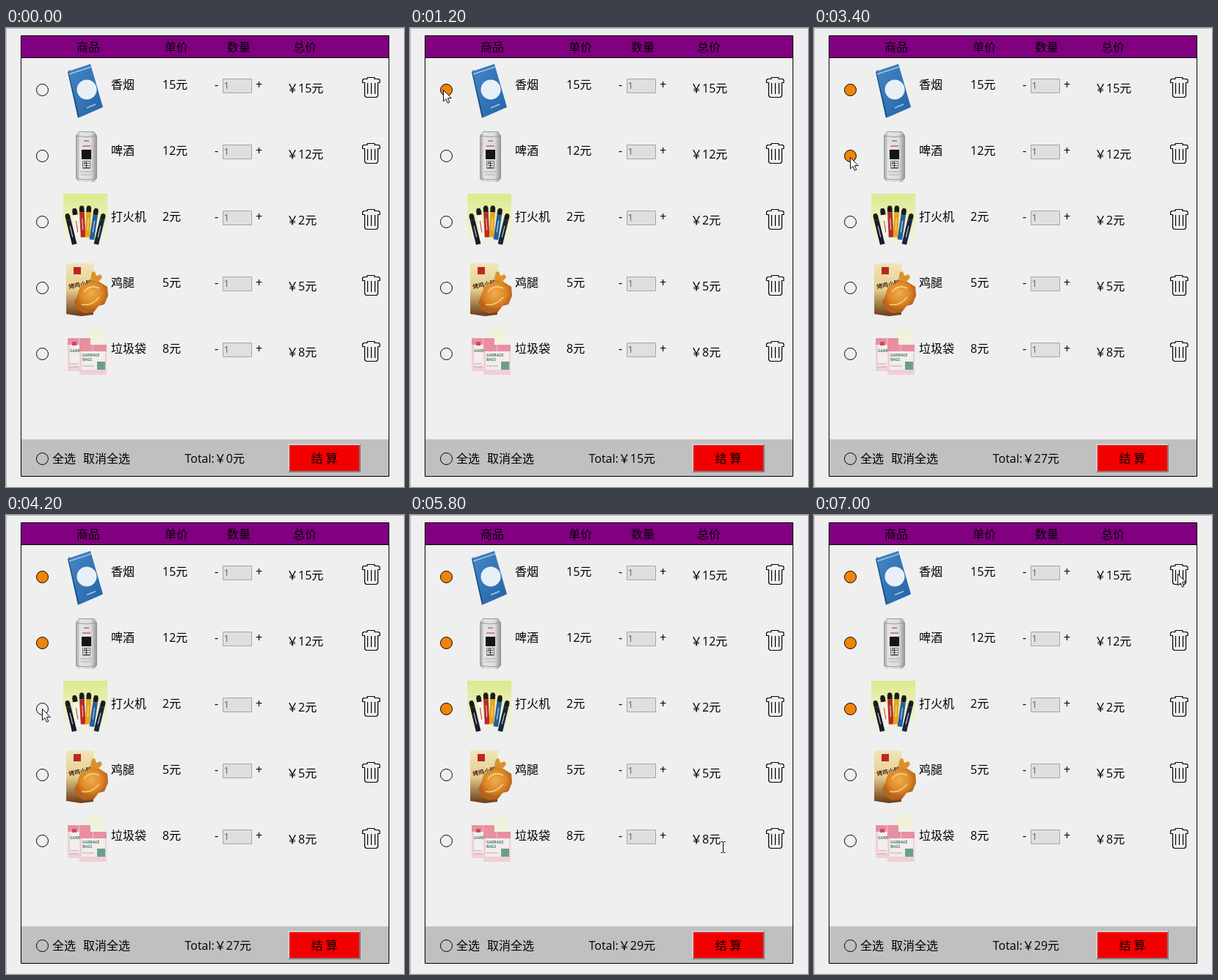
Recreate the animation shown at these times as an HTML page. Size 542 by 626 pixels, loop 8000 ms.

```html
<!DOCTYPE html>
<html lang="zh-CN">
<head>
<meta charset="utf-8">
<style>
html, body { margin: 0; width: 100%; height: 100%; overflow: hidden; background: #efefef; }
svg { display: block; }
text { font: 16px "Open Sans", "Noto Sans CJK SC", "Noto Sans CJK", sans-serif; white-space: pre; }
.box text { font-size: 13.3px; fill: #666; }
.pick { fill: none; stroke: #000; }
.pick.on { fill: #f18407; }
.bin { fill: none; stroke: #000; stroke-width: 1.2; stroke-linejoin: round; }
.tiny { font-size: 5px; font-weight: 700; fill: #47806c; }
</style>
</head>
<body>
<svg width="542" height="626" viewBox="0 0 542 626">
  <defs>
    <linearGradient id="blue" x2="1" y2="1">
      <stop stop-color="#4787c4"/><stop offset="1" stop-color="#2264a8"/>
    </linearGradient>
    <linearGradient id="silver">
      <stop stop-color="#999"/><stop offset=".2" stop-color="#e4e4e4"/>
      <stop offset=".7" stop-color="#ddd"/><stop offset="1" stop-color="#909090"/>
    </linearGradient>
    <linearGradient id="lime" x2="0" y2="1">
      <stop stop-color="#dce98b"/><stop offset=".6" stop-color="#eef2c6"/><stop offset="1" stop-color="#efefef"/>
    </linearGradient>
    <linearGradient id="bag" x2="0" y2="1">
      <stop stop-color="#f0e6b8"/><stop offset=".5" stop-color="#e6cd8c"/><stop offset="1" stop-color="#6b3a18"/>
    </linearGradient>
    <radialGradient id="roast" cx=".5" cy=".4">
      <stop stop-color="#f0ae4c"/><stop offset=".65" stop-color="#dc8726"/><stop offset="1" stop-color="#b9621a"/>
    </radialGradient>
  </defs>

  <path d="M0 .5H542M.5 0V626" stroke="#bdbdbd"/>
  <path fill="#800080" d="M21 11H521V40H21Z"/>
  <path fill="#c0c0c0" d="M21 561H521V611H21Z"/>
  <path fill="none" stroke="#000" d="M20.5 10.5H521.5V611.5H20.5ZM21 40.5H521"/>
  <text x="96" y="32">商品</text><text x="216" y="32">单价</text>
  <text x="301" y="32">数量</text><text x="391" y="32">总价</text>

  <g id="rows"></g>

  <circle class="pick" cx="49.5" cy="587.5" r="8"/>
  <text x="63" y="593">全选</text><text x="105" y="593">取消全选</text>
  <text id="total" x="243.5" y="593"></text>
  <path fill="#808080" d="M384 567H483V606H384Z"/>
  <path fill="#cfcfcf" d="M384 606V567H483L481 569H386V604Z"/>
  <path fill="#f20000" d="M386 569H481V604H386Z"/>
  <text x="433.5" y="593" text-anchor="middle">结 算</text>

  <g id="cursor">
    <path id="arrow" fill="#fff" stroke="#111" d="M.5 .5V16L4 12.7 6.4 18.3 8.8 17.3 6.4 11.7H11.3Z"/>
    <path id="beam" fill="none" stroke="#000" d="M-3 -7.5H-1L0 -6.5 1 -7.5H3M0 -6.5V6.5M-3 7.5H-1L0 6.5 1 7.5H3"/>
  </g>
</svg>
<script>
const $ = id => document.getElementById(id);

// Product pictures, placed relative to the first row.
const cigarettes = `
  <path fill="#184f88" d="M84 60L87 57 101 120 98 123Z"/>
  <path fill="url(#blue)" d="M85 59L115 49 132 108 100 122Z"/>
  <path stroke="#dbe7f2" d="M86 63L116 53"/>
  <circle cx="110" cy="84" r="13.5" fill="#e8f0f7"/>
  <path stroke="#a9c7e2" stroke-width="1.5" d="M110 109L122 104"/>`;

const can = `
  <path fill="url(#silver)" d="M99 51H120L124 57V115L120 120H99L95 115V57Z"/>
  <path stroke="#999" fill="none" d="M99 51.5H120M95 57Q109 60 124 57M96 115Q109 119 123 115"/>
  <path stroke="#c8665f" stroke-width="1.6" d="M106 64H113M104 71H115"/>
  <path fill="#151515" d="M103 76H116V89H103Z"/>
  <path fill="none" stroke="#777" d="M104.5 91.5H114.5V101.5H104.5Z"/>
  <text x="105" y="100" style="font-size:9px">生</text>
  <path stroke="#aaa" d="M101 106H117M102 110H116"/>`;

const lighterColors = ["#171b2b", "#f4f4ee", "#b92a25", "#e6a51b", "#235f9b", "#17263e"];
const lighter = (color, i) => {
  const d = i - 2.5;
  return `<g transform="translate(${108 + d * 10} ${62 + d * d * 1.8}) rotate(${d * 5.5})">
    <path fill="#1b1b1b" d="M-2 0H2L3.3 3V9H-3.3V3Z"/>
    <path fill="${color}" d="M-3.3 9H3.3V43H-3.3Z"/>
    <path stroke="${i == 1 ? "#b33" : "#ddd"}" d="M0 17V33"/></g>`;
};
const lighters = `<path fill="url(#lime)" d="M78 46H138V117H78Z"/>` + lighterColors.map(lighter).join("");

const chicken = `
  <path fill="url(#bag)" d="M82 51H120L119 121 102 123 82 120Z"/>
  <path fill="#bd2525" d="M92 56H102V66H92Z"/>
  <text x="86" y="86" transform="rotate(-12 86 86)" style="font-size:8px;font-weight:700;fill:#49251a">烤鸡小腿</text>
  <path fill="url(#roast)" d="M98 93Q100 79 111 79L116 73 127 76 138 83 139 95 134 107 126 109 120 117 107 119 96 113 93 104Z"/>
  <path fill="#dc9129" d="M115 72L117 63 121 62 123 68 129 66 131 70 125 77Z"/>
  <path fill="none" stroke="#f7cf83" stroke-width="1.5" d="M106 90Q114 79 127 85M103 107Q116 110 127 97"/>`;

const pack = (x, y, w, h) => `
  <path fill="#f0cfd6" d="M${x} ${y}h${w}v${h}h${-w}z"/>
  <path fill="#e88fa2" d="M${x} ${y}h${w}v9h${-w}z"/>
  <path stroke="#f6bcc7" d="M${x + w / 2} ${y}v9"/>
  <path fill="#f3edeb" d="M${x + 3} ${y + 9}h${w - 5}v${h - 16}h${5 - w}z"/>`;
const bags = `
  <ellipse cx="122" cy="60" rx="12" ry="11" fill="#f1f2dc"/>
  ${pack(84, 63, 31, 45)}
  <path fill="#c94b5e" d="M90 68H96V73H90Z"/>
  <text class="tiny" x="87" y="82">GARB</text>
  ${pack(100, 72, 37, 41)}
  <text class="tiny" x="104" y="88">GARBAGE</text>
  <text class="tiny" x="104" y="94">BAGS</text>
  <path fill="#6b9e89" d="M124 95H135V106H124Z"/>
  <path stroke="#c9a3a8" d="M87 98H98M87 102H98M104 101H120"/>`;

const items = [
  ["香烟", 15, cigarettes], ["啤酒", 12, can], ["打火机", 2, lighters],
  ["鸡腿", 5, chicken], ["垃圾袋", 8, bags]
];

$("rows").innerHTML = items.map(([name, price, picture], i) => `
  <g transform="translate(0 ${i * 90})">
    <circle class="pick" cx="49.5" cy="84.5" r="8"/>
    ${picture}
    <text x="143" y="82.5">${name}</text>
    <text x="213" y="82.5">${price}元</text>
    <text x="284" y="82.5">-</text>
    <g class="box">
      <path fill="#dfdfdf" stroke="#a5a5a5" d="M295.5 69.5H334.5V88.5H295.5Z"/>
      <text x="296.5" y="83">1</text>
    </g>
    <text x="340" y="82.5">+</text>
    <text x="382" y="88">￥${price}元</text>
    <path class="bin" d="M492 69.5V67.5H502V69.5H507.5L509 71V74.5H506.5V92.5L504.5 94.5H490.5L488.5 92.5V74.5H485.5V71L487 69.5ZM492.5 75V90M497.5 75V90M502.5 75V90"/>
  </g>`).join("");

// Pointer stops: time, x, y.
const stops = [
  [200, 120, 33], [400, 75, 60], [600, 50, 78], [800, 45, 84],
  [1400, 46, 110], [1600, 47, 136], [1800, 48, 160], [2000, 49, 176],
  [3800, 50, 203], [4000, 50, 238], [4200, 49, 264],
  [4800, 53, 283], [5000, 62, 311], [5200, 120, 370], [5400, 230, 430], [5600, 350, 465], [5800, 426.5, 453],
  [6000, 470, 420], [6200, 505, 330], [6400, 519, 220], [6600, 508, 120], [6800, 492, 81], [7000, 495, 80]
];
const clicks = [1200, 3400, 4600];
const picks = document.querySelectorAll("#rows .pick");

function draw(now) {
  const t = now % 8000;
  const stop = stops.findLast(s => s[0] <= t);
  const overText = t >= 5800 && t < 6000;
  $("cursor").style.display = stop ? "" : "none";
  if (stop) $("cursor").setAttribute("transform", `translate(${stop[1]} ${stop[2]})`);
  $("arrow").style.display = overText ? "none" : "";
  $("beam").style.display = overText ? "" : "none";

  let sum = 0;
  clicks.forEach((time, i) => {
    const on = t >= time;
    picks[i].classList.toggle("on", on);
    if (on) sum += items[i][1];
  });
  $("total").textContent = `Total:￥${sum}元`;
  requestAnimationFrame(draw);
}
draw(0);
</script>
</body>
</html>
```
